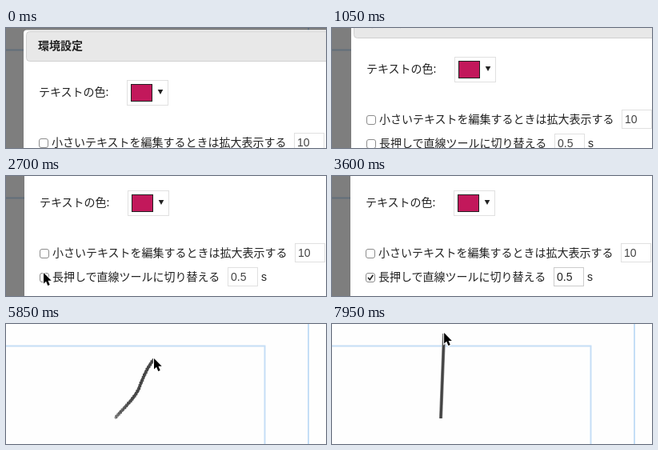
An HTML page for the animation above (8 s loop, 400x150 px).

```html
<!DOCTYPE html>
<html lang="ja">
<meta charset="utf-8">
<style>
html, body { margin: 0; width: 100%; height: 100%; overflow: hidden; background: #fefefe; }
svg { display: block; width: 400px; height: 150px; }
text { font: 14px "Noto Sans CJK JP", "Noto Sans CJK", sans-serif; fill: #222; }
.title { font-weight: 700; }
.num { font-family: "Liberation Sans", Arial, sans-serif; fill: #444; }
.field { fill: #fff; stroke: #e0e0e0; }
.check { fill: #fff; stroke: #8c8c8c; }
.enabled .field { stroke: #ccc; }
.enabled .num { fill: #222; }
</style>
<svg viewBox="0 0 400 150">
  <defs>
    <linearGradient id="lead" gradientUnits="userSpaceOnUse" x1="136" y1="118" x2="158" y2="92">
      <stop offset="0" stop-color="#aaa"/><stop offset=".25" stop-color="#777"/><stop offset="1" stop-color="#505050"/>
    </linearGradient>
  </defs>
  <path d="M0 27.5H323.5V150M378 0V150" fill="none" stroke="#c5def6" stroke-width="2"/>

  <g id="pencil" fill="none">
    <path id="guide" d="M137 117C147 105 163 91 167 78C172 66 177 53 184.5 45" stroke="none"/>
    <path id="stroke" stroke="url(#lead)" stroke-width="3.4" stroke-linecap="round"/>
    <path id="grain" stroke="#333" stroke-opacity=".55" stroke-width="2.6" stroke-dasharray="1.2 .9 .7 1.1"/>
  </g>
  <g id="ruler">
    <path class="line" stroke="#8a8a8a" stroke-width="4.2"/>
    <path class="line" stroke="#444" stroke-width="2.8"/>
  </g>

  <g id="settings">
    <rect width="400" height="150" fill-opacity=".5"/>
    <g id="dialog">
      <rect x="22" y="2.5" width="420" height="300" rx="4" fill="#fff"/>
      <rect x="25.5" y="4.5" width="420" height="37" rx="4" fill="#e8e8e8" stroke="#d0d0d0"/>
      <text class="title" x="40" y="27">環境設定</text>
      <text x="41" y="85">テキストの色:</text>
      <rect class="field" x="151.5" y="65.5" width="51" height="31"/>
      <rect x="156.5" y="70.5" width="26" height="21" fill="#c2185b" stroke="#222"/>
      <path d="M189.7 77h6.6l-3.3 6z" fill="#222"/>
      <rect class="check" x="41.5" y="138.5" width="11" height="11" rx="2.5"/>
      <text x="57" y="147.5">小さいテキストを編集するときは拡大表示する</text>
      <rect class="field" x="360.5" y="131.5" width="37" height="23"/>
      <text class="num" x="364" y="148">10</text>
      <g id="hold">
        <rect class="check" x="41.5" y="168.5" width="11" height="11" rx="2.5"/>
        <path id="tick" d="M44 174l2.3 2.7l4-6" fill="none" stroke="#222" stroke-width="1.7"/>
        <text x="57" y="177.5">長押しで直線ツールに切り替える</text>
        <rect class="field" x="276.5" y="161.5" width="37" height="23"/>
        <text class="num" x="280" y="178">0.5</text>
        <text class="num" x="318" y="178" style="fill:#222">s</text>
      </g>
    </g>
  </g>
  <path id="cursor" d="M0 0V13.5L3.1 10.7L5.3 16L7.7 15L5.5 9.8H9.7Z" stroke="#fff" stroke-width="2" paint-order="stroke"/>
</svg>
<script>
const $ = id => document.getElementById(id);
const STEP = 150, LOOP = 8000;
const span = (t, a, b) => Math.min(1, Math.max(0, (t - a) / (b - a)));
const ease = u => u * u * (3 - 2 * u);
const mix = (a, b, u) => a + (b - a) * u;
const show = (id, on) => $(id).style.display = on ? '' : 'none';
const guide = $('guide'), total = guide.getTotalLength();

function pencilTo(u) {
  let d = '';
  for (let s = 0; s <= u * total; s++) {
    const p = guide.getPointAtLength(s);
    const rough = 0.35 * Math.sin(s * 2.3);
    d += `${s ? 'L' : 'M'}${p.x + rough} ${p.y + rough}`;
  }
  $('stroke').setAttribute('d', d);
  $('grain').setAttribute('d', d);
}

function rulerTip(t) {
  const a = mix(10, 87.8, ease(span(t, 7050, 7950))) * Math.PI / 180;
  return [136 + 107 * Math.cos(a), 118 - 107 * Math.sin(a)];
}

function cursorAt(t) {
  if (t < 1800) return null;
  if (t < 2850) {
    const u = 1 - (1 - span(t, 1800, 2700)) ** 2;
    return [mix(324, 47, u), mix(67, 121, u) + 22 * Math.sin(Math.PI * u) * u];
  }
  if (t < 3600) {
    const u = span(t, 2850, 3600) ** 2;
    return [mix(47, 190, u), mix(121, 170, u)];
  }
  if (t < 4950) return null;
  if (t < 5100) return [196, 92];
  if (t < 6000) {
    const p = guide.getPointAtLength(total * ease(span(t, 5100, 5850)));
    return [p.x + 0.5, p.y - 2];
  }
  if (t < 6150) return [205, 34];
  if (t < 6750) return [197, 24];
  return t < 7050 ? null : rulerTip(t);
}

function draw(t) {
  const k = Math.min(10, t / STEP);
  const dx = Math.round(k < 4 ? k / 2 : 2 - (k - 4) / 6);
  const dy = -Math.round(47 * (k / 10) ** 1.32);
  $('dialog').setAttribute('transform', `translate(${dx} ${dy})`);
  show('settings', t < 4500);
  show('tick', t >= 2850);
  $('hold').setAttribute('class', t >= 2850 ? 'enabled' : '');

  show('pencil', t >= 5250 && t < 6750);
  pencilTo(ease(span(t, 5100, 5850)));

  show('ruler', t >= 7050);
  const [x, y] = rulerTip(t);
  for (const line of document.querySelectorAll('.line'))
    line.setAttribute('d', `M136 118L${x} ${y + 1}`);

  const c = cursorAt(t);
  show('cursor', c);
  if (c) $('cursor').setAttribute('transform', `translate(${c})`);
}

function frame() {
  const t = performance.now() % LOOP;
  draw(Math.floor(t / STEP) * STEP);
  requestAnimationFrame(frame);
}
frame();
</script>
</html>
```
